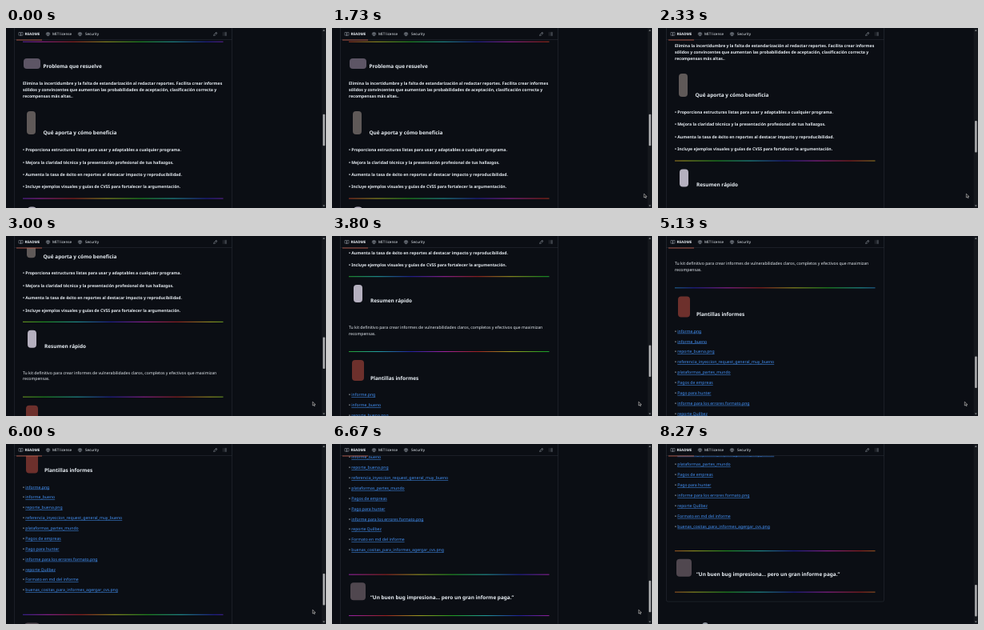
An HTML page for the animation above (8.34 s loop, 400 by 225 pixels).

```html
<!DOCTYPE html>
<html lang="es">
<head>
<meta charset="utf-8">
<style>
html, body { margin: 0; width: 100%; height: 100%; overflow: hidden; background: #0b0e14; }
svg { display: block; width: 100vw; height: 100vh; }
text { font: 5.14px "Noto Sans", sans-serif; fill: #e9eff5; text-rendering: geometricPrecision; white-space: pre; }
.bold { font-weight: 700; }
.head { font-size: 6.42px; font-weight: 700; }
.tab { font-size: 4.54px; }
.link { fill: #4493f8; text-decoration: underline; }
.icon { fill: none; stroke: #9198a1; stroke-width: .55; }
</style>
</head>
<body>
<svg viewBox="0 0 400 225">
  <defs>
    <linearGradient id="rainbow" gradientUnits="userSpaceOnUse" x1="21" x2="271" spreadMethod="repeat"></linearGradient>
    <path id="scales" d="M2.5 0V4.6M1 4.6H4M.4 1H4.6M1 1L0 3.1Q1 3.9 2 3.1ZM4 1L3 3.1Q4 3.9 5 3.1Z"/>
  </defs>
  <g id="page">
    <rect x="10.5" y="-40" width="272" height="623.7" rx="2" fill="none" stroke="#272c34" stroke-width=".6"/>
    <circle cx="59" cy="613.5" r="3.8" fill="#9198a1"/>
  </g>
  <rect x="10.5" y="-3" width="272" height="17.7" fill="#0b0e14" stroke="#272c34" stroke-width=".6"/>
  <path d="M13 15H45" stroke="#c8644f" stroke-width=".8"/>
  <text class="tab bold" x="23.5" y="9">README</text>
  <text class="tab" x="58" y="9">MIT license</text>
  <text class="tab" x="99" y="9">Security</text>
  <g class="icon">
    <path d="M16 5.5H18Q18.5 5.5 18.5 6V9.8Q18.5 9.2 17.8 9.2H16ZM21 5.5H19Q18.5 5.5 18.5 6V9.8Q18.5 9.2 19.2 9.2H21Z"/>
    <use href="#scales" x="50" y="5"/>
    <use href="#scales" x="90" y="5"/>
    <path d="M259.6 9.6L260 8 262.8 5.2 264 6.4 261.2 9.2ZM262 6L263.2 7.2"/>
    <path d="M273 5.8H276M273 7.5H276M273 9.2H276M271.3 5.8H272M271.3 7.5H272M271.3 9.2H272"/>
  </g>
  <rect x="394.6" width="5.4" height="225" fill="#15181d"/>
  <path d="M395.8 3.8L397.3 2 398.8 3.8ZM395.8 221.4L397.3 223.2 398.8 221.4Z" fill="#8b8d90"/>
  <rect id="thumb" x="396" width="2.8" height="39.5" rx="1" fill="#a2a3a5"/>
  <path id="cursor" d="M0 0V4.8L1.2 3.8 2 5.5 2.8 5.1 2 3.5H3.6Z" fill="#111" stroke="#e8e8e8" stroke-width=".5"/>
</svg>
<script>
const LOOP = 8340, STEP = LOOP / 125;
const $ = id => document.getElementById(id);
const page = $('page'), rainbow = $('rainbow');

function add(parent, tag, attrs, content = '') {
  const el = document.createElementNS('http://www.w3.org/2000/svg', tag);
  for (const name in attrs) el.setAttribute(name, attrs[name]);
  el.textContent = content;
  parent.append(el);
  return el;
}
const write = (x, y, content, cls = '') => add(page, 'text', { x, y, class: cls }, content);

for (let i = 0; i <= 6; i++)
  add(rainbow, 'stop', { offset: i / 6, 'stop-color': `hsl(${i * 60} 65% 38%)` });
for (const y of [17.2, 213.1, 306.9, 520.4, 571.8])
  add(page, 'rect', { x: 21, y: y - .5, width: 250.5, height: 1, fill: 'url(#rainbow)' });

// Plain stand-in shapes beside the headings: x, y, width, height, colour
for (const [x, y, width, height, fill] of [
  [22, 38, 21, 13, '#5d5565'],
  [26, 104, 11, 29, '#5f5958'],
  [27, 223.5, 11, 22, '#b5b0bf'],
  [25, 317.5, 15, 26, '#6d302c'],
  [23, 530.5, 19, 22, '#50474f']
]) add(page, 'rect', { x, y, width, height, rx: 4, fill });

write(46.5, 50.3, 'Problema que resuelve', 'head');
write(46.5, 133.3, 'Qué aporta y cómo beneficia', 'head');
write(48, 245.6, 'Resumen rápido', 'head');
write(48, 342, 'Plantillas informes', 'head');
write(48, 551.3, '“Un buen bug impresiona... pero un gran informe paga.”', 'head');

[
  'Elimina la incertidumbre y la falta de estandarización al redactar reportes. Facilita crear informes',
  'sólidos y convincentes que aumentan las probabilidades de aceptación, clasificación correcta y',
  'recompensas más altas..'
].forEach((s, i) => write(21, 71.2 + i * 7.71, s, 'bold'));

[
  'Proporciona estructuras listas para usar y adaptables a cualquier programa.',
  'Mejora la claridad técnica y la presentación profesional de tus hallazgos.',
  'Aumenta la tasa de éxito en reportes al destacar impacto y reproducibilidad.',
  'Incluye ejemplos visuales y guías de CVSS para fortalecer la argumentación.'
].forEach((s, i) => write(21, 154.1 + i * 15.42, '• ' + s, 'bold'));

[
  'Tu kit definitivo para crear informes de vulnerabilidades claros, completos y efectivos que maximizan',
  'recompensas.'
].forEach((s, i) => write(21, 278.4 + i * 7.71, s));

[
  'informe.png', 'informe_bueno', 'reporte_buena.png',
  'referencia_inyeccion_request_general_muy_bueno', 'plataformas_partes_mundo',
  'Pagos de empreas', 'Pago para hunter', 'informe para los errores formato.png',
  'reporte Quilbez', 'Formato en md del informe',
  'buenas_cositas_para_informes_agergar_cvs.png'
].forEach((s, i) => {
  const y = 362.7 + i * 12.87;
  add(write(21, y, '• '), 'tspan', { class: 'link' }, s);
});

const scrollKeys = [[0, 0], [1800, 0], [3000, 105.6], [3800, 162.2], [5130, 241.5], [6670, 357], [6930, 386.7]];
const cursorX = [[70, 399], [930, 390], [1730, 390], [2600, 383.3], [7000, 383.3], [7800, 402]];
const cursorY = [[70, 6], [930, 207.2], [7000, 207.2], [7800, 5]];

// Linear interpolation through [time, value] pairs
function at(keys, t) {
  const i = keys.findIndex(k => k[0] > t);
  if (i < 0) return keys[keys.length - 1][1];
  if (i === 0) return keys[0][1];
  const [t0, a] = keys[i - 1], [t1, b] = keys[i];
  return a + (b - a) * (t - t0) / (t1 - t0);
}

const start = performance.now();
function draw() {
  const clock = (performance.now() - start) % LOOP;
  const t = Math.floor((clock + 10) / STEP) * STEP % LOOP;
  const y = at(scrollKeys, t);
  page.setAttribute('transform', `translate(0 ${-y})`);
  $('thumb').setAttribute('y', 107.8 + y * .1765);
  rainbow.setAttribute('gradientTransform', `translate(${-(187 + t * .04) % 250} 0)`);
  $('cursor').setAttribute('transform', `translate(${at(cursorX, t)} ${at(cursorY, t)})`);
  $('cursor').style.display = t > 60 && t < 7800 ? '' : 'none';
  requestAnimationFrame(draw);
}
draw();
</script>
</body>
</html>
```
